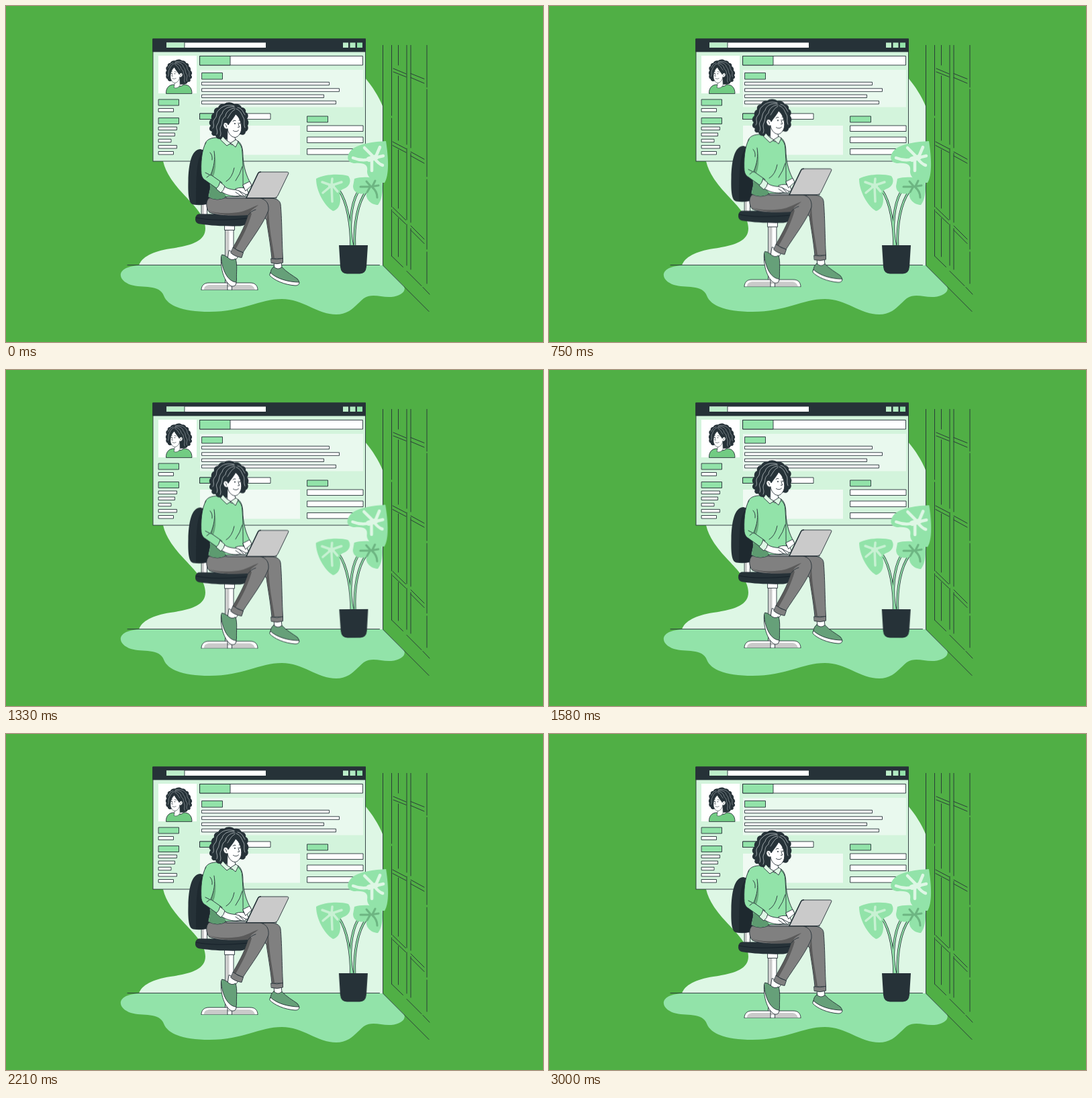
Recreate the animation shown at these times as an HTML page. Size 800 by 500 pixels, loop 3.04 s.

```html
<!DOCTYPE html>
<html lang="en">
<head>
<meta charset="utf-8">
<title>Working on a profile page</title>
<style>
  html, body { margin: 0; width: 100%; height: 100%; overflow: hidden; background: #50af45; }
  svg { display: block; width: 800px; height: 500px; }
  path { stroke-linejoin: round; stroke-linecap: round; }
  .ink { stroke: #263238; stroke-width: .9; }
  .line { fill: none; stroke: #263238; stroke-width: .9; }
  .dark { fill: #263238; }
  .green { fill: #92e3a9; }
  .mist { fill: #def7e5; }
  .white { fill: #fff; }
  .grey { fill: #cacaca; }
  .shoe { fill: #66a079; }
  .pants { fill: #808080; }
  .shade { fill: #5a5a5a; }
  .stem { fill: none; stroke: #263238; stroke-width: 3.6; }
  .sap { stroke: #92e3a9; stroke-width: 2; }
  .vein { fill: none; }
  .strand { fill: none; stroke: #c3cbce; stroke-width: .75; }
  #plant { transform-origin: 515.5px 300px; }
</style>
</head>
<body>
<svg viewBox="0 0 800 500">
  <defs>
    <g id="head">
      <path class="dark" d="M318 198C314 198 313 195 312 193C307 194 305 190 307 187C302 186 302 181 305 178C301 175 303 170 306 168C305 163 307 160 310 159C309 154 312 151 316 151C317 147 321 145 325 146C329 142 337 143 340 146C345 145 350 147 351 151C356 151 358 155 357 158C361 160 362 164 359 168C362 171 362 175 360 178C362 182 360 186 357 187C357 191 353 193 349 191L331 198Q324 200 318 198Z"/>
      <path class="white ink" d="M330 184L329.500 201Q335 209 343 206L341 195Z"/>
      <path class="white ink" d="M330 183C327 184 323 180 324 176C325 172 330 173 331 177C334 172 339 167 342 161C348 165 352 176 350.500 185C349 191 345 195.500 341 195.500C335 195 331 189 330 183Z"/>
      <path class="line" d="M326.500 176q2 1 2 4M346 174q0 4 2 6l-2.500 .5M338 171.500q2 -2 4 -1M347 170q1.500 -1 2.500 0M338.500 185.500q4.500 3 8 -.5"/>
      <circle class="dark" cx="341" cy="175" r="1"/><circle class="dark" cx="348.500" cy="174.500" r=".9"/>
      <path class="strand" d="M340 149C331 146 322 149 318 154C311 159 316 163 311 168C306 174 312 177 308 182M340 150C330 149 323 154 322 160C316 166 319 170 315 176C311 182 317 185 314 191M341 152C333 152 327 159 327 164C320 169 323 174 320 179C317 185 322 188 319 194M341 154C335 157 333 163 330 167M343 153C350 156 351 161 353 165C357 170 353 175 356 181M345 151C352 152 353 158 356 162"/>
    </g>
    <path id="stems" d="M514 357C514 328 509 292 496 274M516.500 357C510 330 514 295 524 277M519.500 357C518 325 524 293 536.500 276"/>
  </defs>

  <rect width="800" height="500" fill="#50af45"/>

  <!-- room -->
  <path class="mist" d="M234 231C239 252 253 268 270 286C283 300 297 314 297 331C297 352 271 357 245 361C218 365 202 374 198 386H561.500V150C555 134 546 120 535 107Z"/>
  <path class="green" d="M198 386H561.500L592 416C598 424 588 432 574 433C558 434 546 427 533 435C520 446 512 459 492 459C464 459 442 436 411 436C377 436 354 455 303 455C266 455 241 447 235 431C229 414 203 420 186 415C165 408 163 388 198 386Z"/>
  <path class="line" d="M181 385.500H556.500M561.500 58.500V386L630 454.500"/>
  <path class="line" d="M574.500 58.500V163M574.500 167V299M574.500 303V372M584.500 58.500V88M584.500 104V200M584.500 214V301M584.500 316V373M597 58.500V206M597 212V318M597 325V386M603 58.500V211M603 219V322M603 331V392M627 58.500V121M627 124V254M627 258V362M627 366V413"/>
  <path class="line" d="M577 93l19 8M577 98l19 7.500M603 100.500l20 8M603 106.500l20 8.500M576 202l20 10.500M576 207.500l20 10.500M603 217l20 11M603 223l20 11M576 299.500l19.500 19M576 306l19.500 18.500M603 327l20 20M603 333.500l20 20M574.500 372l17 16.500M597 394.500l22 22M621 418.500l10 10.500"/>

  <!-- browser -->
  <rect class="ink" x="219" y="49" width="316.500" height="182" fill="#d3f4dc"/>
  <path class="dark ink" d="M219 49h316.500v19h-316.500z"/>
  <path class="white" d="M239 54.500h148v7.500h-148z"/>
  <path d="M239 54.500h27v7.500h-27zM502 54.500h8v7.500h-8z" fill="#bdeeca"/>
  <path class="line" d="M266 54.500v7.500"/>
  <path d="M512.500 54.500h8v7.500h-8z" fill="#b3ebc3"/>
  <path class="green" d="M523 54.500h8v7.500h-8z"/>
  <path d="M289 95h243v55.500h-243z" fill="#e9f9ee"/>
  <path d="M289 178h149v43.500h-149z" fill="#f0faf3"/>
  <path class="white" d="M227 74h57v56h-57z"/>
  <path class="white ink" d="M227.500 152.500h22v5h-22zM227.500 180h27v4.500h-27zM227.500 189h24v4.500h-24zM227.500 198.200h18.500v4.500h-18.500zM227.500 207.400h27v4.500h-27zM227.500 216.500h22v4.500h-22z"/>
  <path class="white ink" d="M289 74.500h242.500v13.500h-242.500zM292 113.300h189.500v4.500h-189.500zM292 122.800h204.500v4.500h-204.500zM292 132h181.500v4.500h-181.500zM292 141.200h199.500v4.700h-199.500zM289 160h105v8.500h-105z"/>
  <path class="white ink" d="M449 178h83v8.500h-83zM449 195h83v8.500h-83zM449 212.500h83v8.500h-83z"/>
  <path class="green ink" d="M227.500 139h30v9h-30zM227.500 166.500h30v9h-30zM289 74.500h45v13.500h-45zM292 99.500h30.500v9.500h-30.500zM289 160h45v8.500h-45zM449 164h30.500v9h-30.500z"/>
  <path class="ink" fill="#72cc83" d="M238.500 130C238 122 243 117 250 117Q257 123 265 117C273 117 277 122 277 130Z"/>
  <use href="#head" transform="translate(480 -16.500) scale(-.67 .67)"/>

  <g id="plant">
    <use class="stem" href="#stems"/>
    <use class="stem sap" href="#stems"/>
    <path class="dark" d="M496 356H539L537 388Q536 398.500 527 398.500H508Q499 398.500 498 388Z"/>
    <path class="green" d="M566 201C550 202 523 204 513 216C506 225 509 234 520 234C533 233 540 236 538 246C538 257 551 264 564 263C571 252 570 226 566 201Z"/>
    <path class="green" d="M462 257C474 250 498 249 510 253C516 261 511 270 501 273C495 276 498 281 498 288C498 298 493 304 487 305C474 297 462 275 462 257Z"/>
    <path class="green" d="M519 257C530 253 551 254 560 261C563 274 559 291 554 296C544 296 535 287 537 278C528 282 517 278 517 268Z"/>
    <g class="vein" stroke="#def7e5" stroke-width="4.500">
      <path d="M517 226Q532 232 545 227L562 223M548 225L534 211M551 224L557 210M545 228L545 245M549 227Q555 235 561 237"/>
      <path d="M541 228L551 225" stroke-width="8"/>
    </g>
    <g class="vein" stroke="#c8f1d3" stroke-width="3.500">
      <path d="M471 262L485 267L500 262M485 267L486 257M484 268L472 278M485 268L486 291M488 269L494 276"/>
      <path d="M483 268L487 267" stroke-width="6"/>
    </g>
    <path class="vein" stroke-width="3" stroke="#6db582" d="M528 269L543 269L555 267M543 268L537 261M546 268L550 260M542 270L538 277M546 270Q553 276 553 285"/>
  </g>

  <g id="worker">
    <!-- chair -->
    <path class="white ink" d="M291.500 290h8v24h-8z"/><path class="grey" d="M292 290h3v23h-3z"/>
    <path class="dark" d="M290 213C276 213 272 236 271.500 260C271 280 272 294 279 295.500C288 297 297 296 303 294V218Z"/>
    <path d="M294 216C284 224 283 250 283 294Q296 297 304 293V216Z" fill="#1e292f"/>
    <path class="white ink" d="M327 330h12v86h-12z"/><path class="grey" d="M327.500 330h5v84h-5z"/>
    <path class="white ink" d="M326 325h14.500v8.500h-14.500z"/>
    <path class="white ink" d="M291 422.500C291 416 295 412 302 412H364C371 412 375 416 375 422.500Z"/>
    <path class="grey" d="M295 422C295 417 299 415 304 415H363Q369 416 371 422H337V418H330V422Z"/>
    <path class="line" d="M330 412v10.500M336.500 412v10.500"/>
    <path class="dark" d="M287 309.500H358Q364 313 361 320Q358 327 349 327.500C328 328 306 327 290 324.500C284 324 282 321 282 317Q282 311 287 309.500Z"/>
    <path d="M283 315Q310 321 361 316" fill="none" stroke="#17212a"/>

    <!-- far leg -->
    <path class="white ink" d="M399 380L400 392Q406 396 411 389L410 380Z"/>
    <path class="shoe ink" d="M399 388Q405 394 411 388.500C418 396 427 401 434 406Q438 410 436 413Q412 414 394 399Q394 391 399 388Z"/>
    <path class="white ink" d="M394 397C403 406 421 411 437 411Q437 416 431 416C415 415 399 408 393 401Z"/>
    <path class="pants ink" d="M370 288C392 285 407 284 409 295C411 313 411 350 412.500 376H396C394 354 390 333 388 318L372 300Z"/>
    <path class="shade" d="M391 302L388 319C391 338 395 355 397 375L400 375C397 353 392 333 391 302Z"/>
    <path class="pants ink" d="M395 376Q404 378 412.500 375.500L412.500 382Q404 385 395.500 382.500Z"/>

    <!-- near leg -->
    <path class="white ink" d="M332 364L330 377Q337 382 342 378L347 371Z"/>
    <path class="shoe ink" d="M322 370Q325 370 330 374Q336 380 342 376C345 385 343 397 343.500 407Q343 417 337 416C327 411 320 388 320.500 373Z"/>
    <path class="white ink" d="M320.500 374C322 393 330 410 343 411Q343 418 336 417C326 412 319 392 320.500 374Z"/>
    <path class="pants ink" d="M302 286C297 291 298 302 303 307C318 314 344 312 361 311C355 331 345 347 338 360L353 367C365 348 385 322 391 304C392 293 387 288 379 286Z"/>
    <path class="shade" d="M301 304C318 313 344 312 361 311C355 331 345 347 338 360L342 362C352 345 361 327 366 309C360 305 373 300 376 296C367 299 356 306 346 307C329 309 313 309 301 304Z"/>
    <path class="line" d="M361 311Q365 305 372 303"/>
    <path class="pants ink" d="M338.500 359.500Q345 365 353.500 367L351 374.500Q341 373 335 367.500Z"/>

    <!-- torso -->
    <path class="green ink" d="M346 201C352 206 353 214 353 224C354 240 358 253 365 265L355 274L342 260Z"/>
    <path class="green ink" d="M321 196C309 195 300 197 297 204C293 214 304 255 304 270L301 284Q315 292 329 284Q342 286 354 280C352 260 354 237 352 218Q352 206 344 202Q334 209 321 196Z"/>
    <path d="M306 262L302 284Q314 291 328 284L324 275Z" fill="#5d9b70"/>
    <path d="M311 219C312 233 308 244 305 250L308 256Q315 241 311 219Z" fill="#6aaa7d"/>
    <path class="line" d="M340 241Q337 256 328 261M352 239Q349 250 342 260"/>

    <use href="#head"/>
    <path class="mist ink" d="M323 194L319.500 199L329 208L335 204Q328 201 323 194ZM335 204L342 210L346 202L343 199Z"/>

    <!-- laptop and hands -->
    <path class="white ink" d="M342 272Q352 268 359 273L362 280L350 281Z"/>
    <path class="white ink" d="M353 266L363 261L366 267L357 275Z"/>
    <path class="grey ink" d="M327 284H403V286H330Q327 286 327 284Z"/>
    <path class="grey ink" d="M379 247H418Q422 247 420.500 250L405 282Q403 285.500 400 285.500H358L375 250Q376.500 247 379 247Z"/>
    <path class="line" d="M358 285.500L375.500 249Q376.500 247 379 247" style="stroke-width:1.600"/>
    <path class="white ink" d="M323 267C333 275 340 272 347 275L358 281Q357 284 351 282.500L342 283C334 283 325 280 319 275Z"/>
    <path class="line" d="M342 277L350 282.500M347 275L354 282"/>
    <path class="green ink" d="M298 203C291 214 290 236 291 250Q292 257 298 260L316 273L322 263L305 251C310 239 312 227 310 216"/>
    <path class="mist ink" d="M319 262L326 268Q325 274 320 278L313 272Q317 269 319 262Z"/>
    <path class="line" d="M297 248L305 252M299 255L303 252M304 218Q308 222 307 229"/>
  </g>
</svg>
<script>
  const LOOP = 3040, CYCLE = 3000;

  // steps: [time in ms, transform]
  function play(id, steps) {
    const frames = steps.map(([ms, transform]) => ({ offset: ms / LOOP, transform }));
    document.getElementById(id).animate(frames, { duration: LOOP, iterations: Infinity });
  }

  const lift = y => `translateY(${y}px)`;
  const turn = deg => `rotate(${deg}deg)`;

  play("worker", [[0, lift(0)], [CYCLE / 2, lift(-9.5)], [CYCLE, lift(0)], [LOOP, lift(0)]]);

  play("plant", [
    [0, turn(0)], [375, turn(1)], [1125, turn(-1)],
    [1500, turn(0)], [1875, turn(1)], [2625, turn(-1)],
    [CYCLE, turn(0)], [LOOP, turn(0)]
  ]);
</script>
</body>
</html>
```
